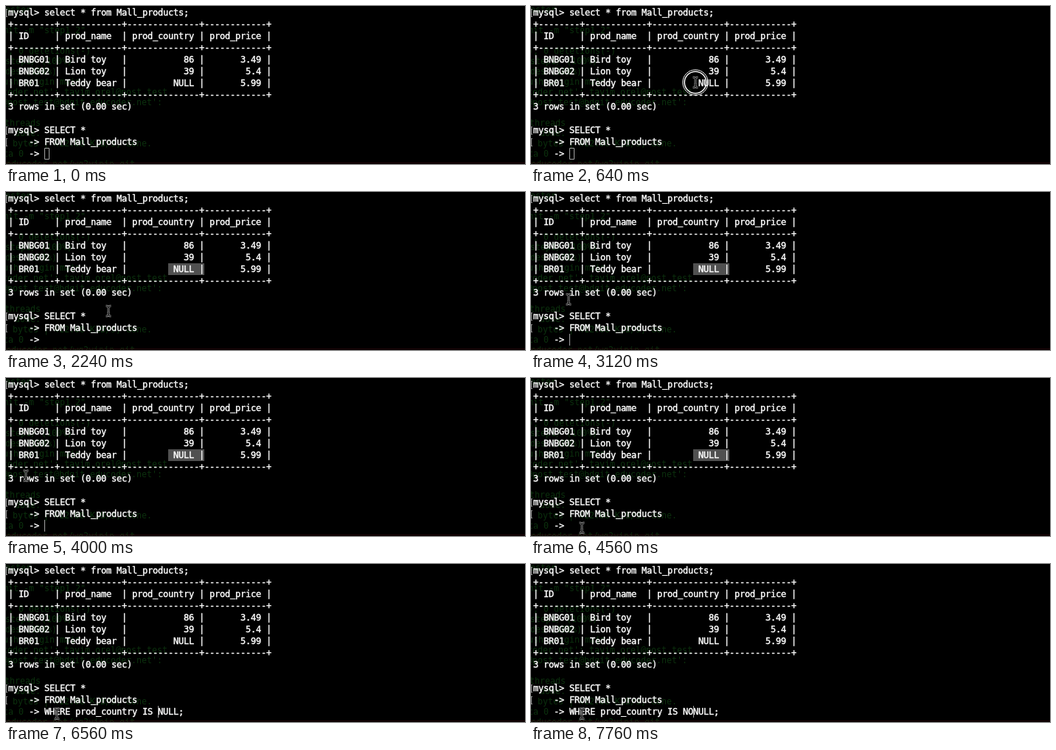
Write an HTML page with a canvas that moves like this. It is 704 by 215 pixels and loops after 8000 ms.

```html
<!DOCTYPE html>
<html lang="en">
<head>
<meta charset="utf-8">
<title>Terminal</title>
<style>
  html, body { margin: 0; width: 704px; height: 215px; overflow: hidden; background: #000; }
  canvas { display: block; }
</style>
</head>
<body>
<canvas id="stage" width="704" height="215"></canvas>
<script>
const ctx = document.getElementById('stage').getContext('2d');
const LOOP = 8000, STEP = 80, CELL = 7, ROW = 16, LEFT = 3, TOP = 1;
const FONT = '"DejaVu Sans Mono", "Liberation Mono", monospace';

const border = [8, 12, 14, 12].map(n => '+' + '-'.repeat(n)).join('') + '+';
const row = (id, name, country, price) =>
  `| ${id.padEnd(6)} | ${name.padEnd(10)} | ${country.padStart(12)} | ${price.padStart(10)} |`;

const lines = [
  'mysql> select * from Mall_products;',
  border,
  row('ID', 'prod_name', 'prod_country', 'prod_price'),
  border,
  row('BNBG01', 'Bird toy', '86', '3.49'),
  row('BNBG02', 'Lion toy', '39', '5.4'),
  row('BR01', 'Teddy bear', 'NULL', '5.99'),
  border,
  '3 rows in set (0.00 sec)',
  '',
  'mysql> SELECT *',
  '    -> FROM Mall_products',
  '    -> '
];

// Window showing through the translucent terminal: line, x, text
const behind = [
  [0, -8, 'master'],
  [2, -4, 'mit -m "step1 2"'],
  [4, -4, '), 0 deletions(-)'],
  [5, -1, 'step1/ (100%)'],
  [6, -1, 'des (100%)'],
  [7, -4, 'ush origin main'],
  [8, -5, "coder.net': tavim.orel@post.test"],
  [9, -5, "@post.test@bdgit.educoder.net':"],
  [11, -2, 'threads'],
  [12, 12, 'done.'],
  [13, 9, 'bytes | 412.00 KiB/s, done.'],
  [14, -4, 'ta 0'],
  [15, 0, 'educoder.net/wq2yipin.git']
];

// Pointer path: time, x, y
const path = [
  [160, 205, 207], [480, 222, 112], [640, 223, 104], [1200, 223, 104],
  [1360, 260, 104], [1520, 267, 104], [1680, 262, 108], [2000, 196, 138],
  [2240, 139, 162], [2560, 92, 158], [2880, 62, 150], [3360, 40, 141],
  [3600, 38, 140], [4000, 27, 133], [4240, 45, 165], [4400, 62, 194], [4560, 69, 204]
];

const cellX = col => LEFT + col * CELL;
const rowY = r => TOP + r * ROW;

// A fine outline gives the heavier strokes of smoothed terminal text
function type(text, x, y, color, weight = 0) {
  ctx.fillStyle = ctx.strokeStyle = color;
  ctx.lineWidth = weight;
  for (let i = 0; i < text.length; i++) {
    if (text[i] === ' ') continue;
    ctx.fillText(text[i], x + i * CELL, y);
    if (weight) ctx.strokeText(text[i], x + i * CELL, y);
  }
}

function pointerAt(t) {
  if (t < path[0][0]) return null;
  const i = path.findIndex(p => p[0] > t);
  if (i < 0) return path[path.length - 1].slice(1);
  const [t0, x0, y0] = path[i - 1], [t1, x1, y1] = path[i];
  const k = (t - t0) / (t1 - t0);
  return [Math.round(x0 + (x1 - x0) * k), Math.round(y0 + (y1 - y0) * k)];
}

function input(t) {
  if (t < 5200) return '';
  const typed = t < 7520 ? '' : t < 7760 ? 'N' : 'NO';
  return `WHERE prod_country IS ${typed}NULL;`;
}

function caretCol(t) {
  if (t < 5200) return 7;
  if (t < 5920) return 34;
  if (t < 7520) return 33 - Math.min(4, Math.floor((t - 5920) / 160));
  return t < 7760 ? 30 : 31;
}

function drawSelection(t) {
  if (t < 1280 || t >= 5200) return;
  const cells = t < 1440 ? 2 : 7;
  ctx.fillStyle = '#505050';
  ctx.fillRect(cellX(31), rowY(6), cells * CELL, ROW);
}

function drawCaret(t) {
  const x = cellX(caretCol(t)), y = rowY(12);
  if (t < 1200) {
    ctx.strokeStyle = '#a4a4a4';
    ctx.lineWidth = 1;
    ctx.strokeRect(x + .5, y + .5, 6, 15);
    return;
  }
  const lit = t >= 5040 || Math.floor(t / 560) % 2 === 1;
  if (!lit) return;
  ctx.fillStyle = '#a4a4a4';
  ctx.fillRect(x, y, 1, ROW);
}

function beam(x, y, color, width) {
  ctx.strokeStyle = color;
  ctx.lineWidth = width;
  ctx.beginPath();
  for (const s of [-1, 1]) {
    ctx.moveTo(x - 3.5, y + 7 * s);
    ctx.quadraticCurveTo(x, y + 7 * s, x, y + 4.5 * s);
    ctx.quadraticCurveTo(x, y + 7 * s, x + 3.5, y + 7 * s);
  }
  ctx.moveTo(x, y - 5);
  ctx.lineTo(x, y + 5);
  ctx.moveTo(x - 2, y + 3);
  ctx.lineTo(x + 2, y + 3);
  ctx.stroke();
}

function ring(x, y, r, width) {
  ctx.lineWidth = width;
  ctx.beginPath();
  ctx.arc(x, y, r, 0, Math.PI * 2);
  ctx.stroke();
}

function drawPointer(t) {
  const p = pointerAt(t);
  if (!p) return;
  const [x, y] = p;
  beam(x, y, '#777', 3);
  beam(x, y, '#1c1c1c', 1);
  if (t >= 560 && t < 1600) {
    ctx.strokeStyle = '#f4f4f4';
    ring(x, y, 17.2, 1);
    ring(x, y, 14.8, 1.6);
  }
}

function drawMark(r) {
  const y = rowY(r) + 3;
  ctx.fillStyle = '#8a8a8a';
  ctx.fillRect(0, y, 1, 11);
  ctx.fillRect(0, y, 2, 1);
  ctx.fillRect(0, y + 10, 2, 1);
}

function draw(t) {
  ctx.fillStyle = '#000';
  ctx.fillRect(0, 0, 704, 215);
  ctx.lineJoin = 'round';
  ctx.font = '11.6px ' + FONT;
  for (const [n, x, text] of behind) type(text, x, 9 + n * 14, '#0b300d');
  ctx.fillStyle = '#240609';
  ctx.fillRect(0, 213, 704, 1);
  drawSelection(t);
  ctx.font = '12px ' + FONT;
  lines.forEach((text, r) => type(text, LEFT, rowY(r) + 12, '#fff', .4));
  type(input(t), cellX(7), rowY(12) + 12, '#fff', .4);
  [0, 10, 11].forEach(drawMark);
  drawCaret(t);
  drawPointer(t);
}

const start = performance.now();
function tick() {
  const t = (performance.now() - start) % LOOP;
  draw(Math.floor(t / STEP) * STEP);
  requestAnimationFrame(tick);
}
tick();
</script>
</body>
</html>
```
